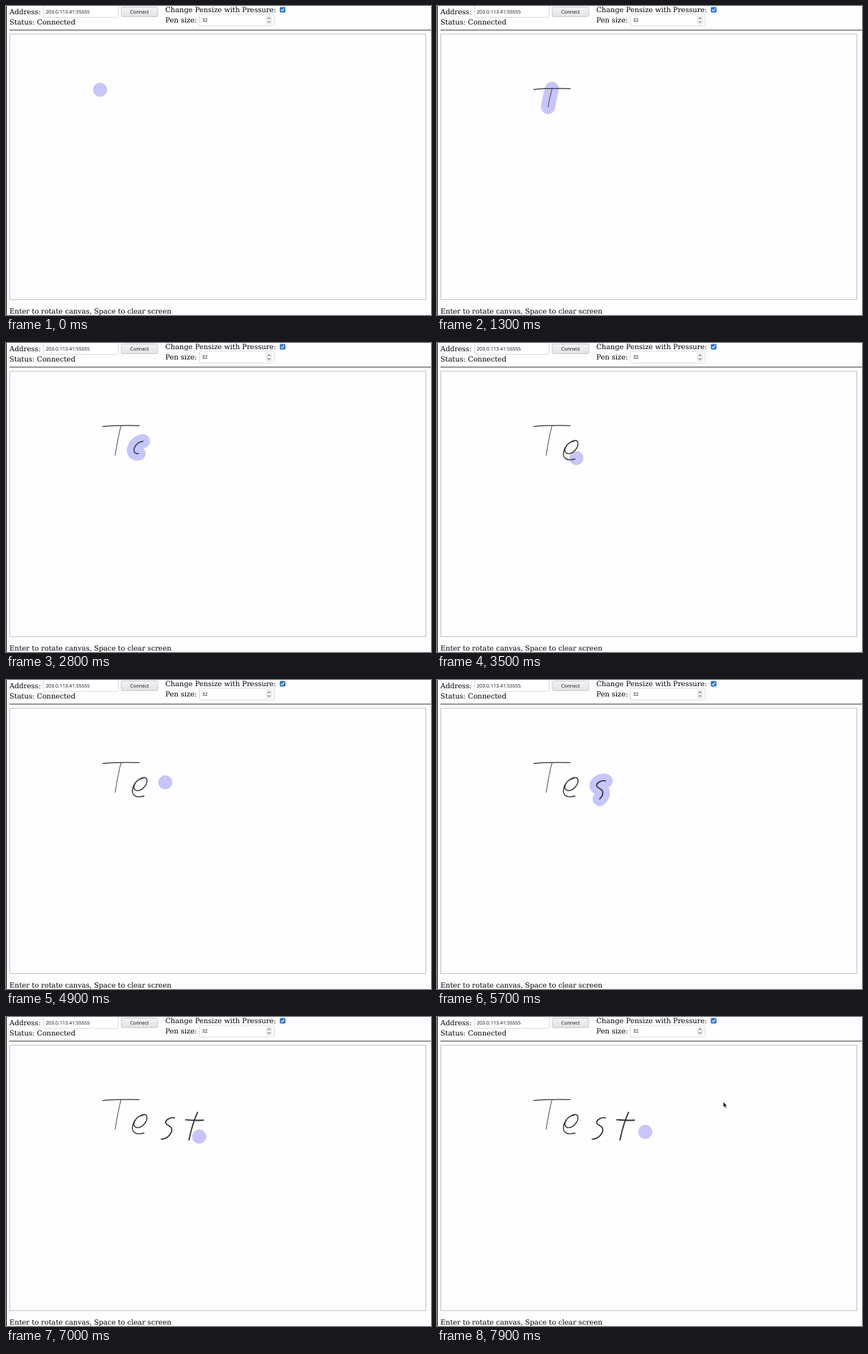
Write an HTML page that moves like this. It is 619 by 450 pixels and loops after 8000 ms.

```html
<!DOCTYPE html>
<html lang="en">
<head>
<meta charset="utf-8">
<title>Pen canvas</title>
<style>
  html, body { margin: 0; width: 100%; height: 100%; overflow: hidden; background: #fefdff; }
  svg { display: block; width: 619px; height: 450px; }
  text { text-rendering: geometricPrecision; }
  .label { font: 10.29px "DejaVu Serif", "Noto Serif", serif; fill: #000; }
  .field { font: 7.07px "Noto Sans", "Open Sans", sans-serif; fill: #1a1c1d; }
  .box { fill: #fff; stroke: #d4d2d2; stroke-width: .8; }
  .pen { fill: none; stroke-linecap: round; stroke-linejoin: round; }
</style>
</head>
<body>
<svg viewBox="0 0 619 450">
  <defs>
    <linearGradient id="face" x2="0" y2="1">
      <stop stop-color="#f4f3f3"/><stop offset="1" stop-color="#e3e2e1"/>
    </linearGradient>
  </defs>
  <rect width="619" height="450" fill="#fefdff"/>
  <rect width="1" height="450" fill="#111"/>
  <rect x="5" y="34.5" width="614" height="1.2" fill="#555"/>
  <rect x="5.5" y="41" width="606" height="386.7" fill="none" stroke="#bbb" stroke-width=".9"/>

  <g class="label">
    <text x="5" y="12">Address:</text>
    <text x="5" y="27">Status: Connected</text>
    <text x="232" y="9.3">Change Pensize with Pressure:</text>
    <text x="232" y="24">Pen size:</text>
    <text x="5" y="448">Enter to rotate canvas, Space to clear screen</text>
  </g>

  <rect class="box" x="54.5" y="-.5" width="109" height="17" rx="1.8"/>
  <rect x="168" y="1.5" width="53" height="14" rx="1.8" fill="url(#face)" stroke="#c2c0bf" stroke-width=".8"/>
  <rect class="box" x="281.5" y="12" width="109" height="17" rx="1.8"/>
  <g class="field">
    <text x="58" y="11">203.0.113.41:55555</text>
    <text x="194.4" y="11" text-anchor="middle">Connect</text>
    <text x="285.5" y="23.3">32</text>
  </g>
  <rect x="379.5" y="14.7" width="7" height="11.6" rx="1.2" fill="#f1f0f0" stroke="#d0d0d0" stroke-width=".6"/>
  <path d="M381.2 18.8l1.8-1.8 1.8 1.8M381.2 22.4l1.8 1.8 1.8-1.8" fill="none" stroke="#444"/>
  <rect x="398.8" y="1.6" width="8.2" height="7.8" rx="1.4" fill="#2a73d9"/>
  <path d="M400.7 5.5l1.6 1.7 3-3.6" fill="none" stroke="#fff" stroke-width="1.2"/>

  <path id="trail" class="pen" stroke="#c6c5fd" stroke-width="20.6"/>
  <g id="ink" class="pen" stroke="#303032"></g>
  <path id="mouse" d="M0 0v8l1.8-1.6 1.3 2.9 1.4-.6-1.3-2.8h2.4z" fill="#111" stroke="#fff" stroke-width=".5"/>
</svg>
<script>
const LOOP = 8000, STEP = 100;
const $ = id => document.getElementById(id);
const clamp = k => Math.max(0, Math.min(1, k));

const moves = [];
let pen = { x: 137, y: 122 }, clock = 0;

// Continues the pen's route up to a time; a width puts ink on the canvas.
function move(end, curve, width = 0) {
  const path = document.createElementNS("http://www.w3.org/2000/svg", "path");
  const d = `M${pen.x} ${pen.y} ${curve}`;
  path.setAttribute("d", d);
  path.setAttribute("stroke-width", width);
  $("ink").append(path);
  const length = path.getTotalLength();
  moves.push({ start: clock, end, d, width, path, length });
  pen = path.getPointAtLength(length);
  clock = end;
}

// T
move(180, "L141 121.6");
move(640, "Q156 119.8 194 120.3", 1.3);
move(1050, "L167.5 120.5");
move(1400, "Q163.5 135 159 163.5", .9);
// e
move(1800, "L186 150");
move(2400, "L199.5 143");
move(3400, "C187 145 182 160 190.5 161 S207 151 205 144.5 S188 145 184.8 157 S190 172 201 169", 1.4);
// s
move(4900, "L232 149");
move(5370, "L245.5 147");
move(5770, "C240 145 232 150 232.5 154 S241.5 158 241.5 164 S235 177.5 226 178", 1.7);
// t
move(6050, "L262 149.6");
move(6320, "Q274 151 287.5 150.3", 1.9);
move(6480, "Q278 150 279 138.8");
move(6880, "Q272 153 266.5 179", 1.8);
move(7200, "L306 166");
move(7300, "L303.3 167.3");

const dash = (path, shown, length) =>
  path.setAttribute("stroke-dasharray", `${shown} ${length + 1}`);

function render(t) {
  for (const { start, end, width, path, length } of moves) {
    const k = clamp((t - start) / (end - start));
    path.style.display = width && k > 0 ? "" : "none";
    dash(path, length * k ** 1.4, length);
  }

  const now = moves.find(m => t < m.end) || moves[moves.length - 1];
  const k = clamp((t - now.start) / (now.end - now.start));
  if (now.width) {
    $("trail").setAttribute("d", now.d);
    dash($("trail"), Math.max(.01, now.length * k ** 1.4), now.length);
  } else {
    const { x, y } = now.path.getPointAtLength(now.length * k);
    $("trail").setAttribute("d", `M${x} ${y}h.01`);
    $("trail").removeAttribute("stroke-dasharray");
  }

  // The mouse glides in from the right and slows down.
  const left = (1 - clamp((t - 7500) / 400)) ** 1.5;
  $("mouse").setAttribute("transform", `translate(${417 + 123 * left} ${123.5 + 15 * left})`);
  $("mouse").style.display = t >= 7500 ? "" : "none";
}

const origin = performance.now();
function tick() {
  const t = (performance.now() - origin) % LOOP;
  render(Math.floor(t / STEP) * STEP);
  requestAnimationFrame(tick);
}
tick();
</script>
</body>
</html>
```
